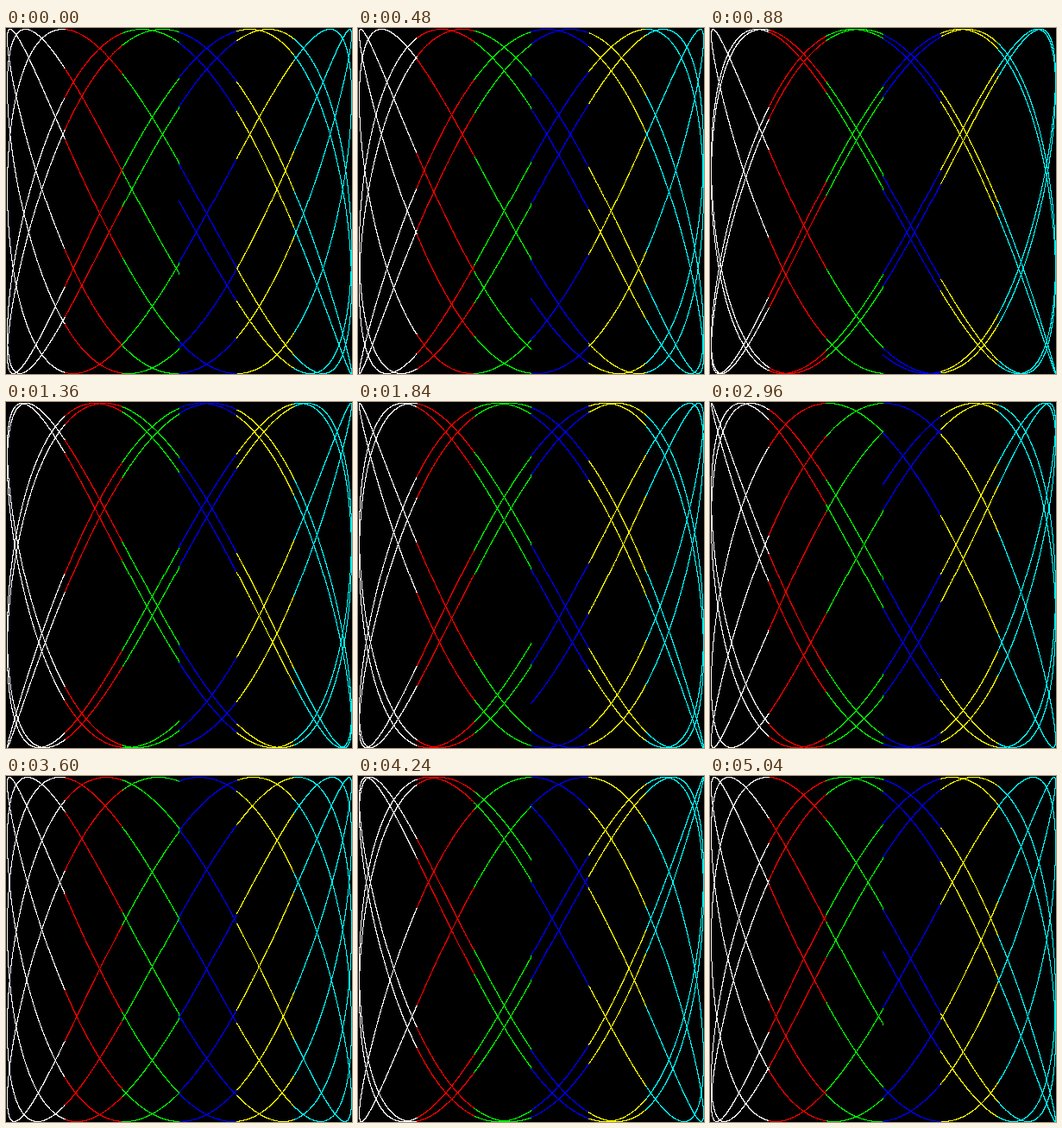
An HTML page with a canvas that plays this animation: 401 px wide and 401 px high, repeating every 5120 ms.

```html
<!DOCTYPE html>
<html>
<head>
<meta charset="utf-8">
<title>Lissajous</title>
<style>
  html, body { margin: 0; height: 100%; overflow: hidden; background: #000; }
  canvas { display: block; }
</style>
</head>
<body>
<canvas width="401" height="401"></canvas>
<script>
const RADIUS = 200, SIZE = 2 * RADIUS + 1;
const FREQUENCY = 1.8139808639388588;  // vertical oscillations per horizontal one
const CYCLES = 5, RESOLUTION = 0.001;
const STEPS = 64, STEP_MS = 80, PHASE_STEP = 0.1;

// White, red, green, blue, yellow, cyan from left to right, as ABGR
const BANDS = [0xffffffff, 0xff0000ff, 0xff00ff00, 0xffff0000, 0xff00ffff, 0xffffff00];
const BLACK = 0xff000000;

const context = document.querySelector('canvas').getContext('2d');
const image = context.createImageData(SIZE, SIZE);
const pixels = new Uint32Array(image.data.buffer);

// Truncating toward zero keeps the curve off the first row and column
const toPixel = v => RADIUS + Math.trunc(v * RADIUS + 0.5);

function draw(phase) {
  pixels.fill(BLACK);
  for (let t = 0; t < CYCLES * 2 * Math.PI; t += RESOLUTION) {
    const x = Math.sin(t);
    const y = Math.sin(t * FREQUENCY + phase);
    const band = Math.min(5, Math.floor((x + 1) * 3));
    pixels[toPixel(y) * SIZE + toPixel(x)] = BANDS[band];
  }
  context.putImageData(image, 0, 0);
}

let shown = -1;
function tick() {
  const step = Math.floor(performance.now() / STEP_MS) % STEPS;
  if (step !== shown) draw(step * PHASE_STEP);
  shown = step;
  requestAnimationFrame(tick);
}
tick();
</script>
</body>
</html>
```
